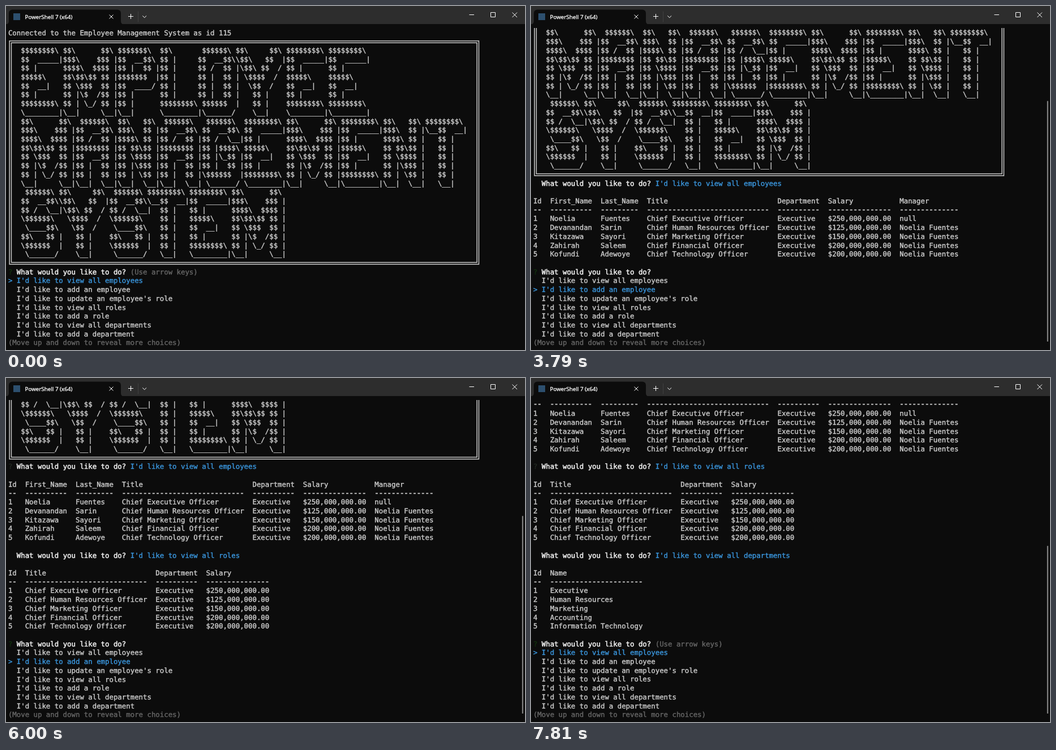
Write an HTML page that moves like this. It is 917 px wide and 610 px high and loops after 8 s.

```html
<!DOCTYPE html>
<html lang="en">
<head>
<meta charset="utf-8">
<title>Employee manager terminal</title>
<style>
  html, body { margin: 0; width: 100%; height: 100%; overflow: hidden; background: #0c0c0c; }
  svg { display: block; width: 917px; height: 610px; }
  #screen text {
    font: 12.36px "DejaVu Sans Mono", "Noto Sans Mono", monospace;
    white-space: pre; text-rendering: geometricPrecision;
    fill: currentColor; stroke: currentColor; stroke-width: .4px; color: #ccc;
  }
  #screen .ask { color: #f2f2f2; stroke-width: .5px; }
  #screen .rule { stroke-width: .8px; }
  #screen .pick { color: #3a96dd; }
  #screen .hint { color: #666; }
  #screen .mark { color: #12300f; }
  #screen .old { color: #222822; }
  .frame { fill: none; stroke: #ccc; stroke-width: 1.5; }
  .icon { fill: none; stroke: #fff; stroke-width: 1; }
  .tab { font: 500 9.85px "Open Sans", "Noto Sans", sans-serif; fill: #fff; stroke: #fff; stroke-width: .35px; }
</style>
</head>
<body>
<svg viewBox="0 0 917 610">
  <defs><clipPath id="view"><rect y="39" width="917" height="571"/></clipPath></defs>
  <rect width="917" height="610" fill="#0c0c0c"/>
  <rect width="917" height="32" fill="#2d2d2d"/>
  <path d="M0 32.5Q5 32 5 27V13Q5 6.5 11.5 6.5H196.5Q203 6.5 203 13V27Q203 32 208 32.5Z" fill="#0c0c0c"/>
  <rect x="13" y="13" width="12" height="12" fill="#2d4f6e"/>
  <text class="tab" x="33.5" y="23.3">PowerShell 7 (x64)</text>
  <path class="icon" d="M182.500 15.500l7 7m0-7l-7 7M216 18.500h9m-4.500-4.500v9M241.300 17.300l3.400 3.400 3.400-3.400"/>
  <path d="M233.500 9.500v19" stroke="#414141"/>
  <path class="icon" d="M818.500 15.500h8.500M856.500 11.500h8v8h-8zM894.500 11.500l8.500 8.500m0-8.500l-8.500 8.500"/>
  <g clip-path="url(#view)"><g id="screen"></g></g>
  <rect id="thumb" x="911.8" width="2" fill="#8c8c8c"/>
</svg>
<script>
const LOOP = 8000, CELL_W = 7.441, CELL_H = 15.71, LEFT = 3.9, BASE = 51.5;
const ROWS = 36, PAGE = 10, BAR_END = 595, BAR_H = 545;

const enterTimes = [1450, 4990, 7740];
const barTimes = [1520, 5050, 7810];
const downTimes = [3790, 3990, 4190, 6000, 6200, 6400, 6600, 6800];

const choices = [
  "I'd like to view all employees", "I'd like to add an employee",
  "I'd like to update an employee's role", "I'd like to view all roles",
  "I'd like to add a role", "I'd like to view all departments",
  "I'd like to add a department", "I'm done managing employees"
];
const answers = [choices[0], choices[3], choices[5]];

// Banner letters, eight lines each
const letters = {};
String.raw`
$$$$$$$$\
$$  _____|
$$ |
$$$$$\
$$  __|
$$ |
$$$$$$$$\
\________|
$$\      $$\
$$$\    $$$ |
$$$$\  $$$$ |
$$\$$\$$ $$ |
$$ \$$$  $$ |
$$ |\$  /$$ |
$$ | \_/ $$ |
\__|     \__|
$$$$$$$\
$$  __$$\
$$ |  $$ |
$$$$$$$  |
$$  ____/
$$ |
$$ |
\__|
$$\
$$ |
$$ |
$$ |
$$ |
$$ |
$$$$$$$$\
\________|
 $$$$$$\
$$  __$$\
$$ /  $$ |
$$ |  $$ |
$$ |  $$ |
$$ |  $$ |
 $$$$$$  |
 \______/
$$\     $$\
\$$\   $$  |
 \$$\ $$  /
  \$$$$  /
   \$$  /
    $$ |
    $$ |
    \__|
 $$$$$$\
$$  __$$\
$$ /  $$ |
$$$$$$$$ |
$$  __$$ |
$$ |  $$ |
$$ |  $$ |
\__|  \__|
$$\   $$\
$$$\  $$ |
$$$$\ $$ |
$$ $$\$$ |
$$ \$$$$ |
$$ |\$$$ |
$$ | \$$ |
\__|  \__|
 $$$$$$\
$$  __$$\
$$ /  \__|
$$ |$$$$\
$$ |\_$$ |
$$ |  $$ |
\$$$$$$  |
 \______/
$$$$$$$$\
\__$$  __|
   $$ |
   $$ |
   $$ |
   $$ |
   $$ |
   \__|
 $$$$$$\
$$  __$$\
$$ /  \__|
\$$$$$$\
 \____$$\
$$\   $$ |
\$$$$$$  |
 \______/
`.trimEnd().split("\n").slice(1).forEach((line, i) => {
  const name = "EMPLOYANGTS"[i >> 3];
  (letters[name] ||= []).push(line);
});

const indent = s => s.length - s.trimStart().length;

// Sets letters as close together as their outlines allow
function banner(word) {
  let lines = Array(8).fill("");
  for (const ch of word) {
    const glyph = letters[ch];
    const width = Math.max(...lines.map(l => l.length));
    const gap = Math.min(...lines.map((l, i) => width - l.length + indent(glyph[i])));
    const start = width - gap;
    lines = lines.map((l, i) => l.padEnd(start + indent(glyph[i])) + glyph[i].trimStart());
  }
  return lines;
}

function table(head, rows) {
  const widths = head.map((h, i) => Math.max(h.length, ...rows.map(r => r[i].length)));
  const join = cells => cells.map((c, i) => c.padEnd(widths[i])).join("  ");
  return [join(head), join(widths.map(w => "-".repeat(w))), ...rows.map(join)];
}

const boss = "Noelia Fuentes";
const staff = [
  ["Noelia", "Fuentes", "Executive", "250"],
  ["Devanandan", "Sarin", "Human Resources", "125"],
  ["Kitazawa", "Sayori", "Marketing", "150"],
  ["Zahirah", "Saleem", "Financial", "200"],
  ["Kofundi", "Adewoye", "Technology", "200"]
].map(([first, last, area, pay], i) => ({
  id: String(i + 1), first, last, title: `Chief ${area} Officer`,
  pay: `$${pay},000,000.00`, manager: i ? boss : "null"
}));
const departments = ["Executive", "Human Resources", "Marketing", "Accounting", "Information Technology"];

const tables = [
  table(["Id", "First_Name", "Last_Name", "Title", "Department", "Salary", "Manager"],
    staff.map(p => [p.id, p.first, p.last, p.title, "Executive", p.pay, p.manager])),
  table(["Id", "Title", "Department", "Salary"],
    staff.map(p => [p.id, p.title, "Executive", p.pay])),
  table(["Id", "Name"], departments.map((d, i) => [String(i + 1), d]))
];
const art = ["EMPLOYEE", "MANAGEMENT", "SYSTEM"].flatMap(banner);

const screen = document.getElementById("screen");
const thumb = document.getElementById("thumb");

function add(tag, attrs, text = "") {
  const el = document.createElementNS("http://www.w3.org/2000/svg", tag);
  for (const k in attrs) el.setAttribute(k, attrs[k]);
  el.textContent = text;
  screen.append(el);
}

function put(row, col, text, cls = "") {
  const lift = cls === "rule" ? 1 : 0;
  add("text", { x: LEFT + col * CELL_W, y: BASE + row * CELL_H - lift, class: cls }, text);
}

function ask(row, mark) {
  if (mark) put(row, 0, "?", mark);
  put(row, 2, "What would you like to do?", "ask");
}

function draw(done, sel) {
  screen.replaceChildren();
  screen.setAttribute("transform", `translate(0 ${-done * PAGE * CELL_H})`);
  put(0, 0, "Connected to the Employee Management System as id 115");
  for (const d of [-1.65, 1.65])
    add("rect", { class: "frame", x: 7.8 + d, y: 63.6 + d, width: 826 - 2 * d, height: 392.7 - 2 * d });
  art.forEach((line, i) => put(2 + i, 3, line));

  for (let n = 0; n < done; n++) {
    const row = 27 + n * PAGE;
    ask(row, n < done - 1 && "old");
    put(row, 29, answers[n], "pick");
    tables[n].forEach((line, i) => put(row + 2 + i, 0, line, i === 1 ? "rule" : ""));
  }

  const row = 27 + done * PAGE, first = Math.max(0, sel - 3);
  ask(row, "mark");
  if (!sel) put(row, 29, "(Use arrow keys)", "hint");
  for (let i = 0; i < 7; i++) {
    const active = first + i === sel;
    if (active) put(row + 1 + i, 0, ">", "pick");
    put(row + 1 + i, 2, choices[(first + i) % choices.length], active ? "pick" : "");
  }
  put(row + 8, 0, "(Move up and down to reveal more choices)", "hint");
}

let shown = "";
function update(t) {
  const past = times => times.filter(x => x <= t).length;
  const done = past(enterTimes), bar = past(barTimes);
  const since = done ? enterTimes[done - 1] : 0;
  const sel = downTimes.filter(x => x > since && x <= t).length;
  const key = `${done} ${sel} ${bar}`;
  if (key === shown) return;
  shown = key;
  draw(done, sel);
  const h = bar ? BAR_H * ROWS / (ROWS + bar * PAGE) : 0;
  thumb.setAttribute("y", BAR_END - h);
  thumb.setAttribute("height", h);
}

const start = performance.now();
function tick() {
  update((performance.now() - start) % LOOP);
  requestAnimationFrame(tick);
}
tick();
</script>
</body>
</html>
```
